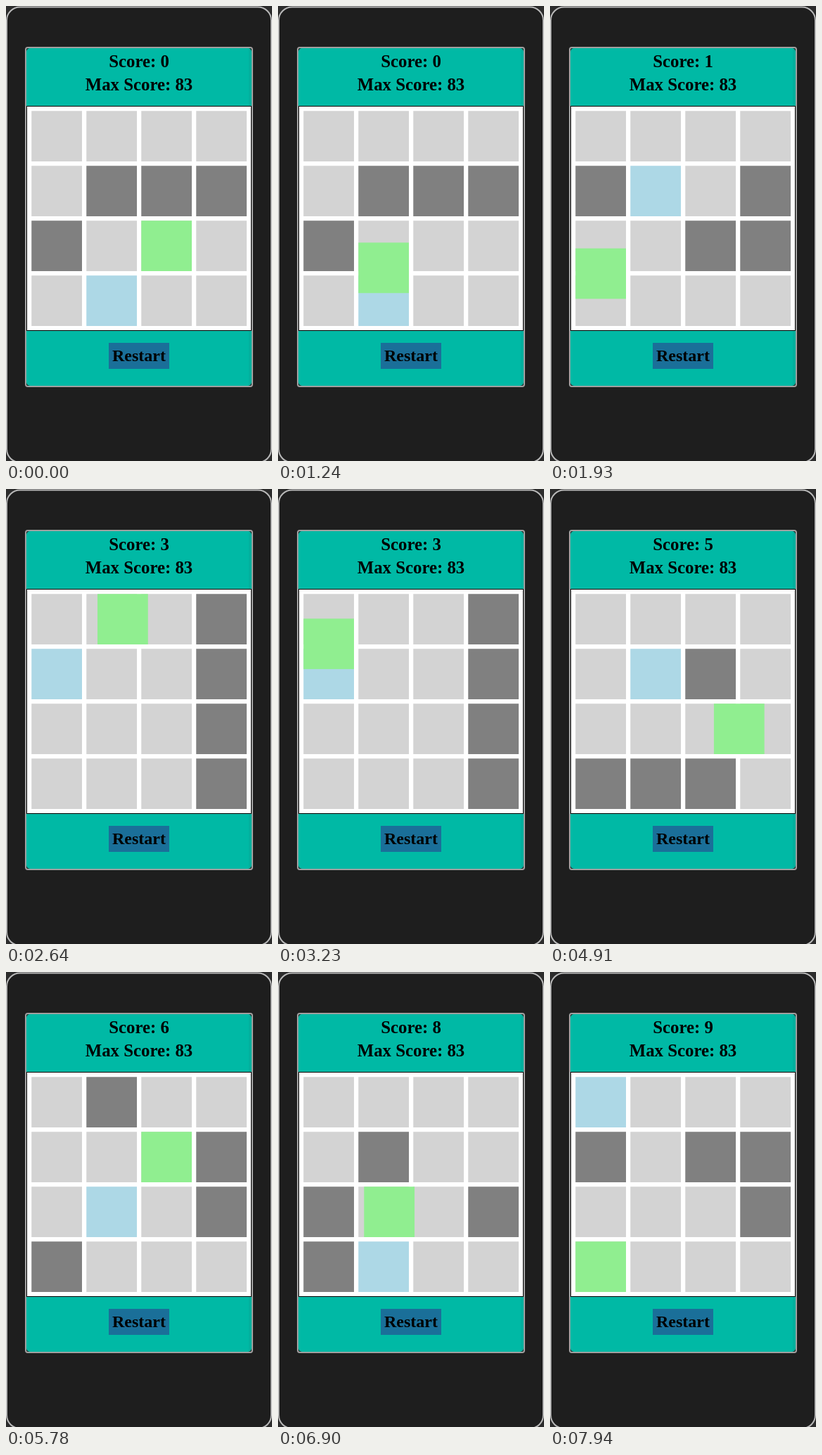
Write an HTML page that moves like this. It is 378 px wide and 647 px high and loops after 8 s.

```html
<!DOCTYPE html>
<html lang="en">
<head>
<meta charset="utf-8">
<title>Sliding square game</title>
<style>
  html, body { margin: 0; width: 100%; height: 100%; overflow: hidden; background: #2c2c2c; }
  svg { display: block; }
  text { font: bold 24.8px "Liberation Serif", "Times New Roman", serif; text-anchor: middle; }
</style>
</head>
<body>
<svg width="378" height="647" viewBox="0 0 378 647">
  <rect x="1" y="1.5" width="376" height="647.5" rx="19" fill="#1e1e1e" stroke="#b9b9b9" stroke-width="2"/>
  <rect x="28" y="59" width="322" height="482" rx="3" fill="#1e1e1e" stroke="#a0a0a0" stroke-width="2"/>
  <rect x="29" y="60" width="320" height="480" rx="5" fill="#00b9a5"/>
  <rect x="345" y="62" width="4" height="476" opacity=".05"/>
  <text id="score" x="189" y="87"></text>
  <text x="189" y="120">Max Score: 83</text>
  <rect x="29.5" y="142.5" width="319" height="319" fill="#fff" stroke="#000"/>
  <g id="cells"></g>
  <rect x="146" y="479" width="86" height="37" fill="#1a6f99"/>
  <text x="189" y="505" style="font-size:24px">Restart</text>
</svg>
<script>
const LOOP = 8000, REFRESH = 140, CELL_MS = 132, REACH = 0.85;
const PITCH = 78, SIZE = 71.75, LEFT = 36.25, TOP = 149.25;
const COLOR = { '.': '#d3d3d3', '#': '#808080', o: '#add8e6' };
const STEP = { L: [-1, 0], R: [1, 0], U: [0, -1], D: [0, 1], '.': [0, 0] };

// Successive boards: # wall, o goal
const boards = [
  '.... .### #... .o..', '.... #o.# ..## ....', '..o# #... ..## ....', '...# o..# ...# ...#',
  '.... ..#. o... ###.', '.... .o#. .... ###.', '.#.. .o.# ...# #...', '.#.. ...# .o.# #...',
  '.... .#.. #o.# #...', '.... .#.. #..# #o..', 'o... #.## ...# ....'
].map(rows => rows.replaceAll(' ', ''));

// Bursts of play: time, cells covered by then, path (. waits, * reshuffles the walls)
const bursts = [
  [310, 0.45, 'L'], [1240, 0.4, 'D.L'], [1930, 0.495, 'URUURLL'], [3100, 0.45, 'DD'],
  [3780, 0.94, 'UUDD'], [4520, 0.4, 'RRRD*LLUUR'], [6060, 0.8, 'DDLUR'],
  [6900, 0.897, 'L'], [7630, 0.4, 'DL']
];

const group = document.getElementById('cells');
const score = document.getElementById('score');

function square(fill) {
  const rect = document.createElementNS('http://www.w3.org/2000/svg', 'rect');
  rect.setAttribute('width', SIZE);
  rect.setAttribute('height', SIZE);
  rect.setAttribute('fill', fill);
  return group.appendChild(rect);
}

function place(rect, col, row) {
  rect.setAttribute('x', LEFT + PITCH * col);
  rect.setAttribute('y', TOP + PITCH * row);
}

const cells = Array.from({ length: 16 }, (_, i) => {
  const rect = square(COLOR['.']);
  place(rect, i % 4, i >> 2);
  return rect;
});
const player = square('#90ee90');

// Replays the game up to the given time
function play(time) {
  let col = 2, row = 2, board = 0, points = 0;
  for (const [start, covered, path] of bursts) {
    if (time < start) break;
    const refreshes = Math.floor((time - start) / REFRESH);
    let left = covered + refreshes * REFRESH / CELL_MS;
    for (const key of path) {
      if (left <= 0) break;
      if (key === '*') { board++; continue; }
      const [dx, dy] = STEP[key], part = Math.min(1, left);
      const goal = boards[board].indexOf('o');
      const target = col + dx + 4 * (row + dy);
      if (key !== '.' && target === goal && part >= REACH) { board++; points++; }
      col += dx * part;
      row += dy * part;
      left -= part;
    }
  }
  return { col, row, board, points };
}

function draw(now) {
  const { col, row, board, points } = play(now % LOOP);
  score.textContent = 'Score: ' + points;
  cells.forEach((cell, i) => cell.setAttribute('fill', COLOR[boards[board][i]]));
  place(player, col, row);
}

let origin;
function loop(now) {
  origin ??= now;
  draw(now - origin);
  requestAnimationFrame(loop);
}
draw(0);
requestAnimationFrame(loop);
</script>
</body>
</html>
```
